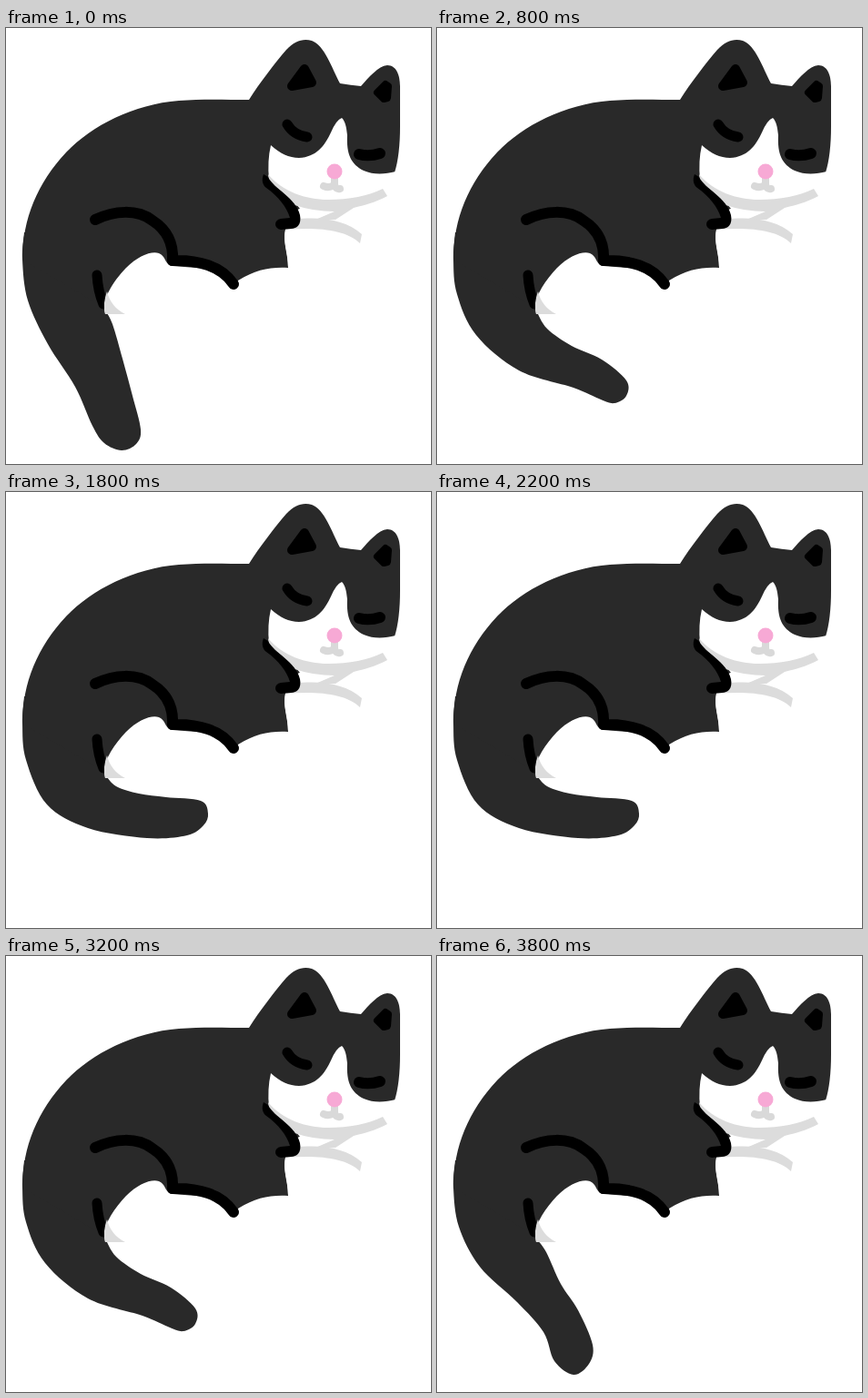
Recreate the animation shown at these times as an HTML page. Size 467x480 px, loop 4 s.

```html
<!DOCTYPE html>
<html lang="en">
<head>
<meta charset="utf-8">
<title>Sleeping cat</title>
<style>
  html, body { margin: 0; width: 100%; height: 100%; overflow: hidden; background: #fff; }
  svg { display: block; width: 467px; height: 480px; }
  .fur { fill: #292929; }
  .white { fill: #fff; }
  .shade { fill: #dcdcdc; }
  .line { fill: none; stroke: #000; stroke-linecap: round; stroke-linejoin: round; }
</style>
</head>
<body>
<svg viewBox="0 0 467 480">
  <path id="tail" class="fur"/>

  <!-- body and head -->
  <path class="fur" d="M18 255C18 210 35 170 66 137C95 107 140 84 190 80C215 78 240 79 267 79
    C279 60 296 38 308 24C317 14 327 11 336 14C350 19 358 44 367 61Q379 63 390 64
    C399 54 409 42 419 41C429 41 433 52 433 64L433 108Q433 140 427 159L320 200L307 222
    C304 236 310 244 310 264C290 263 275 266 255 278L248 290L108 308Z"/>

  <!-- face -->
  <path class="white" d="M291 129C301 138 311 143 322 143C341 142 350 130 357 115Q363 101 369 99
    C373 103 374 109 375 118C374 139 379 150 393 157C404 162 417 161 428 158
    Q424 173 414 184L385 202L325 202Q317 189 289 167Q287 146 291 129Z"/>
  <path class="shade" d="M288 161C304 180 329 189 354 189C377 189 398 185 414 177L419 185
    C406 192 394 195 382 198L362 211L340 211L361 202Q338 202 317 195L289 168Z"/>

  <!-- front paws -->
  <path class="white" d="M307 222Q345 211 375 222Q390 228 390 242C384 260 345 266 310 264
    C310 248 304 237 307 222Z"/>
  <path class="shade" d="M315 211C345 207 373 211 391 227L389 237C374 222 342 219 307 222Z"/>
  <path d="M283 161L288 164C294 177 319 187 323 206C325 216 320 221 313 221L302 222
    C294 221 294 211 302 210L312 209C309 198 299 185 286 176C281 172 281 166 283 161Z"/>

  <!-- hind leg -->
  <path class="line" stroke-width="11" d="M100 272Q101 290 107 304"/>
  <path class="white" d="M109 315C105 298 117 280 132 264C145 251 160 245 168 248
    C176 251 175 262 183 262L235 266Q250 276 252 290C248 299 220 304 180 310Q145 315 109 315Z"/>
  <path class="shade" d="M111 290Q106 303 109 315L131 315Q115 307 111 290Z"/>
  <path class="line" stroke-width="12" d="M98 211C119 201 144 199 161 212C178 223 184 239 183 256
    C211 255 237 262 250 282"/>

  <!-- ears, eyes, nose and mouth -->
  <path class="line" style="fill:#000" stroke-width="10" d="M328 45L336 60L314 64Z"/>
  <path class="line" style="fill:#000" stroke-width="8" d="M417 62L420 64L419 77L415 78L408 71Z"/>
  <path class="line" stroke-width="11" d="M309 106Q316 118 331 120"/>
  <path class="line" stroke-width="12" d="M388 139Q399 142 411 138"/>
  <path class="line" style="stroke:#d9d9d9" stroke-width="8" d="M361 165V172Q356 177 349 174M361 172Q362 178 367 177"/>
  <circle cx="361" cy="158" r="8.5" fill="#f7a9d5"/>
</svg>
<script>
  // Tail outlines, x y pairs: outer edge, round the tip, back along the inner edge.
  const poses = [
    "24 300 46 348 76 395 95 438 108 457 127 465 143 458 148 442 139 405 128 364 117 326",
    "24 298 47 342 88 381 117 414 129 446 150 461 167 449 171 428 155 390 136 361 120 326",
    "22 293 43 338 90 377 150 396 180 409 195 413 208 405 208 388 181 365 148 350 121 331",
    "20 292 43 346 89 371 160 381 203 372 220 359 226 345 214 331 170 336 144 331 121 323",
    "22 295 45 344 90 370 155 381 199 378 217 367 222 354 214 340 176 336 146 332 121 324"
  ].map(s => s.split(" ").map(Number));

  // Position between poses for each step of the swing; it then runs backwards.
  const swing = [0, 1, 1.3, 1.6, 2, 2.25, 2.57, 3, 3.7, 4, 2.57];
  const STEP = 200, LOOP = 4000;
  const tail = document.getElementById("tail");

  function outline(u) {
    const i = Math.min(Math.floor(u), poses.length - 2);
    const mix = poses[i].map((v, j) => v + (poses[i + 1][j] - v) * (u - i));
    const pts = [[20, 225], [18, 255]];
    for (let j = 0; j < mix.length; j += 2) pts.push([mix[j], mix[j + 1]]);
    pts.push([109, 311]);
    return pts;
  }

  // Smooth curve through all points (Catmull-Rom as Béziers).
  function smooth(pts) {
    const at = i => pts[Math.max(0, Math.min(pts.length - 1, i))];
    let d = "M" + pts[0];
    for (let i = 0; i < pts.length - 1; i++) {
      const [a, b, c, e] = [at(i - 1), at(i), at(i + 1), at(i + 2)];
      const p = b.map((v, k) => v + (c[k] - a[k]) / 6);
      const q = c.map((v, k) => v - (e[k] - b[k]) / 6);
      d += `C${p} ${q} ${c}`;
    }
    return d;
  }

  function draw(now) {
    const n = Math.floor((now % LOOP) / STEP);
    const u = swing[Math.min(n, LOOP / STEP - n)];
    tail.setAttribute("d", smooth(outline(u)) + "L105 230Z");
  }

  const start = performance.now();
  function tick() {
    draw(performance.now() - start);
    requestAnimationFrame(tick);
  }
  tick();
</script>
</body>
</html>
```
